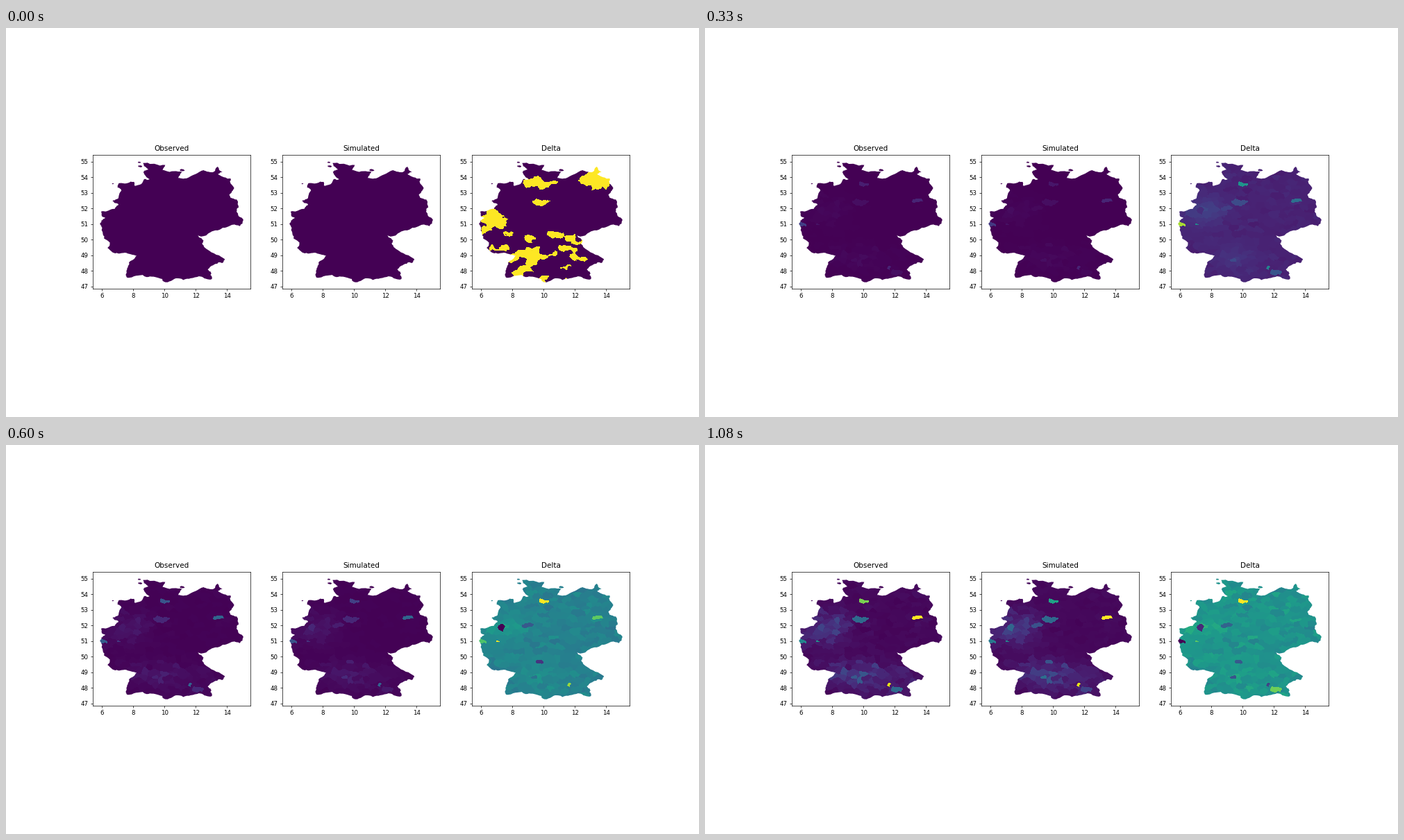
A matplotlib script for the animation above (1110 ms loop, 998 px wide and 561 px high).

```python
import matplotlib.pyplot as plt
import numpy as np
from matplotlib.animation import FuncAnimation
from matplotlib.path import Path

FRAMES, INTERVAL = 37, 30
DPI = 62.375
XLIM, YLIM = (5.408, 15.5), (46.88, 55.448)
rng = np.random.default_rng(7)

# Main corners of the border (lon, lat), clockwise from the north-west
BORDER = [
    (8.64, 54.91), (10.05, 54.78), (9.87, 54.47), (11.13, 54.39), (10.87, 53.95),
    (11.42, 53.93), (12.5, 54.45), (13.12, 54.33), (13.4, 54.68), (13.7, 54.33),
    (13.42, 54.2), (14.22, 53.92), (14.43, 53.25), (14.14, 52.86), (14.62, 52.57),
    (14.74, 52.07), (14.6, 51.82), (15.04, 51.27), (14.82, 50.87), (14.3, 50.95),
    (13.25, 50.6), (12.33, 50.2), (12.1, 50.31), (12.5, 49.95), (12.4, 49.75),
    (12.65, 49.43), (13.84, 48.77), (13.73, 48.52), (13.44, 48.55), (12.76, 48.1),
    (13.0, 47.85), (13.02, 47.48), (12.2, 47.66), (11.2, 47.42), (10.87, 47.53),
    (10.2, 47.28), (9.6, 47.56), (8.6, 47.75), (7.6, 47.58), (7.52, 47.75),
    (7.75, 48.45), (8.22, 48.97), (7.45, 49.17), (6.73, 49.17), (6.37, 49.47),
    (6.52, 49.8), (6.13, 50.1), (6.02, 50.75), (5.87, 51.03), (6.22, 51.4),
    (5.95, 51.8), (6.83, 51.98), (7.06, 52.25), (6.68, 52.48), (7.05, 52.65),
    (7.2, 53.25), (7.0, 53.35), (7.1, 53.62), (8.05, 53.7), (8.1, 53.45),
    (8.5, 53.55), (8.7, 53.88), (9.05, 53.87), (8.65, 54.33), (8.95, 54.47),
]
# lon, lat, half width
ISLANDS = [(8.39, 54.95, .09), (8.45, 54.7, .13), (11.12, 54.45, .15), (6.7, 53.58, .06)]

# Hotspots: lon, lat, half width, observed, simulated, then delta at DELTA_KEYS
DELTA_KEYS = (3, 20, 25)
HOTSPOTS = [
    (9.99, 53.57, .25, .8, .58, .09, 1, 1),
    (13.4, 52.5, .29, 1, 1, .02, .75, .5),
    (11.55, 48.14, .18, .96, .96, .08, .85, .2),
    (6.05, 51.04, .28, .45, .4, 1, .72, 0),
    (6.97, 50.95, .16, .52, .46, 0, 1, .75),
    (7.33, 51.84, .3, .2, .33, .25, 0, .12),
    (8.92, 52.0, .3, .12, .25, .1, .28, .32),
    (9.72, 49.62, .32, .13, .26, .1, .15, .28),
    (9.75, 52.4, .42, .34, .34, .02, .47, .54),
    (9.32, 48.68, .26, .28, .36, .09, .38, .26),
    (12.15, 47.92, .3, .34, .2, .09, .45, .78),
]


def roughen(points, rounds=3, amount=.09):
    """Break every edge at a displaced midpoint, several times over."""
    pts = np.array(points)
    for _ in range(rounds):
        step = np.roll(pts, -1, axis=0) - pts
        size = np.hypot(*step.T)[:, None].clip(max=.7)
        mid = pts + step / 2 + rng.normal(0, amount, pts.shape) * size * (1.3, .8)
        pts = np.stack([pts, mid], axis=1).reshape(-1, 2)
    return pts


def closed(pts):
    return Path(np.vstack([pts, pts[:1]]), closed=True)


def oval(lon, lat, rx):
    a = np.linspace(0, 2 * np.pi, 8, endpoint=False)
    return np.column_stack([lon + rx * np.cos(a), lat + rx / 2 * np.sin(a)])


def scatter_centres(count, tries=12):
    """Evenly spread random centres, wider apart in longitude."""
    pts = np.array([[10., 51.]])
    while len(pts) < count:
        cand = rng.uniform((XLIM[0], YLIM[0]), (XLIM[1], YLIM[1]), (tries, 2))
        gap = (cand[:, None] - pts[None]) / (1.6, 1)
        pts = np.vstack([pts, cand[(gap ** 2).sum(2).min(1).argmax()]])
    return pts


def smooth(k, start, end):
    t = np.clip((k - start) / (end - start), 0, 1)
    return t * t * (3 - 2 * t)


land = Path.make_compound_path(
    closed(roughen(BORDER)), *(closed(roughen(oval(*i), 1, .25)) for i in ISLANDS))

# A warped sampling grid gives ragged district borders
gx, gy = np.meshgrid(np.linspace(*XLIM, 456), np.linspace(*YLIM, 386))
wx, wy = gx.copy(), gy.copy()
for freq in (6, 11, 19, 31):
    for _ in range(2):
        a, p, q = rng.uniform(0, 2 * np.pi, 3)
        wave = freq * (np.cos(a) * gx + np.sin(a) * gy)
        wx += .4 / freq * np.sin(wave + p)
        wy += .22 / freq * np.sin(wave + q)

# Districts: nearest centre, with the hotspots cut in on top
spots = np.array(HOTSPOTS)
centres = scatter_centres(540)
plain = len(centres)
district = np.zeros(gx.shape, int)
nearest = np.full(gx.shape, np.inf)
for n, (lon, lat) in enumerate(centres):
    dist = ((wx - lon) / 1.6) ** 2 + (wy - lat) ** 2
    closer = dist < nearest
    nearest[closer] = dist[closer]
    district[closer] = n
for n, (lon, lat, r) in enumerate(spots[:, :3]):
    district[np.hypot(wx - lon, 2 * (wy - lat)) < r] = plain + n
centres = np.vstack([centres, spots[:, :2]])
lons, lats = centres.T


def bump(lon, lat, sx, sy):
    return np.exp(-((lons - lon) / sx) ** 2 - ((lats - lat) / sy) ** 2)


def noise(sigma=1):
    return rng.normal(0, sigma, len(centres))


west = bump(7.6, 51.8, 1.3, 1)
south = bump(9.4, 48.8, 1.5, .9)
level = .02 + .15 * west + .15 * south + .06 * bump(12, 48.4, 1.3, 1)
observed = level * np.exp(noise(.35))
simulated = .7 * observed + .3 * level * np.exp(noise(.45))
observed[plain:], simulated[plain:] = spots[:, 3], spots[:, 4]
power = np.full(len(centres), 1.9)
power[plain + 3] = .75  # the western hotspot starts ahead of the rest

# Opening delta: a few clusters, plus scattered districts in the south
clusters = (bump(13.4, 53.95, 1.25, .95) + bump(6.8, 51.3, 1, .6)
            + bump(9.8, 53.6, 1.1, .3) + bump(9.7, 52.4, .4, .2)
            + .8 * bump(9.3, 48.9, 1, .8))
first = (clusters > .5) | ((lats < 50.7) & (noise() > .9))
drift = noise()


def delta(k):
    if k == 0:
        return first.astype(float)
    rise = smooth(k, 10, 27)
    base = .09 + .55 * rise - .13 * smooth(k, 25, 36)
    peak = .06 + .06 * np.exp(-((k - 15) / 6) ** 2)
    value = (base + peak * smooth(k, 0, 12) * (west + .5 * south)
             + (.008 + .02 * rise) * drift)
    value[plain:] = [np.interp(k, DELTA_KEYS, s[5:]) for s in spots]
    return value


plt.rcParams["font.family"] = "DejaVu Sans"
fig, axes = plt.subplots(1, 3, figsize=(998 / DPI, 561 / DPI), dpi=DPI)
fig.subplots_adjust(left=.125, right=.9, bottom=.125, top=.88, wspace=.2)

maps = []
for ax, title in zip(axes, ("Observed", "Simulated", "Delta")):
    im = ax.imshow(np.zeros(gx.shape), cmap="viridis", vmin=0, vmax=1,
                   extent=(*XLIM, *YLIM), origin="lower",
                   interpolation="nearest", aspect="equal")
    im.set_clip_path(land, ax.transData)
    ax.set(title=title, xlim=XLIM, ylim=YLIM,
           xticks=range(6, 15, 2), yticks=range(47, 56))
    maps.append(im)


def update(k):
    growth = (k / (FRAMES - 1)) ** power
    for im, value in zip(maps, (observed * growth, simulated * growth, delta(k))):
        im.set_data(value[district])
    return maps


anim = FuncAnimation(fig, update, frames=FRAMES, interval=INTERVAL,
                     repeat=True, repeat_delay=0, blit=False)
plt.show()
```
